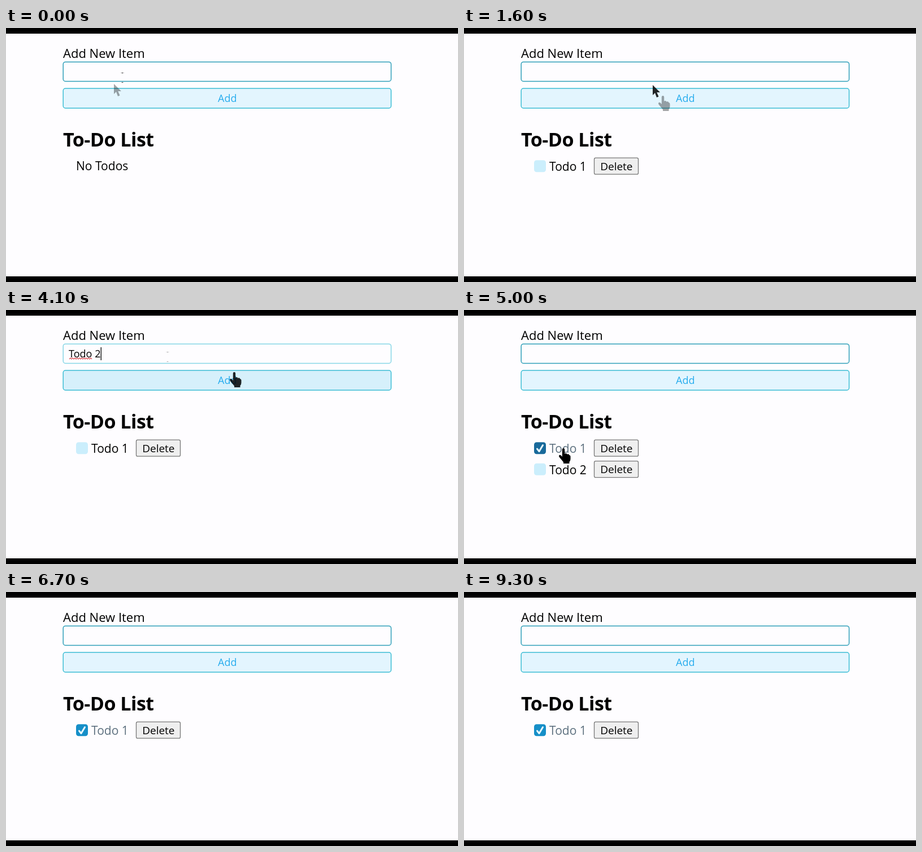
An HTML page that plays this animation: 800x450 px, repeating every 9.4 s.

```html
<!DOCTYPE html>
<html lang="en">
<head>
<meta charset="utf-8">
<title>To-do list</title>
<style>
  html, body { margin: 0; width: 100%; height: 100%; overflow: hidden; background: #000; }
  svg { display: block; width: 800px; height: 450px; font: 21px "Open Sans", "Noto Sans", sans-serif; }
  text { white-space: pre; }
  .label { font-size: 22px; }
  .title { font-size: 34px; font-weight: 700; letter-spacing: -.5px; }
  .small { font-size: 18px; font-weight: 500; }
  .add { fill: #28adee; text-anchor: middle; }
  .box { stroke-width: 1.5; }
  .delete rect { fill: #efefef; stroke: #777; stroke-width: 1.3; }
  .delete.hover rect { fill: #e4e4e4; }
  .delete text { font-size: 19px; font-weight: 500; text-anchor: middle; }
  .check { fill: #cbeefc; }
  .tick { display: none; fill: none; stroke: #e6f8ff; stroke-width: 3; stroke-linecap: round; stroke-linejoin: round; }
  .done .check { fill: #168fc8; }
  .done.hover .check { fill: #196a9b; }
  .done .tick { display: inline; }
  .done .name { fill: #5d707f; }
  .cursor path { fill: #fff; stroke: #222; stroke-width: 1.2; stroke-linejoin: round; }
  .cursor .beam { fill: none; stroke-width: 1.4; }
</style>
</head>
<body>
<svg viewBox="0 0 800 450">
  <defs>
    <g id="arrow"><path d="M0 0V18l4-4 3 8 3.5-1.5-3.2-7.5H13z"/></g>
    <g id="beam"><path class="beam" d="M-4-9q4 0 4 2 0-2 4-2M0-7V7M-4 9q4 0 4-2 0 2 4 2"/></g>
    <g id="hand">
      <path d="M-2.2 1.2a2.2 2.2 0 0 1 4.4 0V9q0-1 2-1t2.3 2q0-1 1.8-.8t2 1.8q2.2 0 2.2 2.5V18q0 3-2 5v3H0v-2.5L-7 15q-2-3 0-4 2-.8 4.8 3z"/>
      <path d="M2.2 9v5M6.2 10.5v4M9.4 11.5v3.5"/>
    </g>
  </defs>
  <rect y="10" width="800" height="430" fill="#fefdff"/>
  <text class="label" x="101" y="52.5">Add New Item</text>
  <rect id="field" class="box" x="101.2" y="60.2" width="580.4" height="34.2" rx="4"/>
  <text id="value" class="small" x="111" y="84"></text>
  <path id="squiggle" fill="none" stroke="#d8434a" stroke-width="1.1"/>
  <path id="caret" stroke="#000" stroke-width="1.3"/>
  <rect id="add" class="box" x="101.2" y="107" width="580.4" height="35" rx="4" stroke="#3bbdd4"/>
  <text class="small add" x="391.8" y="130.7">Add</text>
  <text class="title" x="101" y="210">To-Do List</text>
  <text id="empty" x="124" y="252">No Todos</text>
  <g id="rows"></g>
  <g id="ghost" class="cursor" opacity=".35"><use/></g>
  <g id="pointer" class="cursor"><use/></g>
</svg>
<script>
const LOOP = 9400, STEP = 100, ROW = 37.5;
const $ = id => document.getElementById(id);

$("rows").innerHTML = [1, 2].map(n => `
  <g id="row${n}" transform="translate(0 ${(n - 1) * ROW})">
    <rect class="check" x="124" y="234.2" width="21" height="21" rx="4.5"/>
    <path class="tick" d="M129.5 246l3.5 4.5 6.5-11"/>
    <text class="name" x="151" y="253">Todo ${n}</text>
    <g id="delete${n}" class="delete">
      <rect x="230.5" y="230.2" width="78" height="29" rx="2.5"/>
      <text x="269.8" y="251.6">Delete</text>
    </g>
  </g>`).join("");

let wave = "M112 87";
for (let i = 0; i < 10; i++) wave += "l2-2 2 2";
$("squiggle").setAttribute("d", wave);

// time, x, y of the pointer's hot spot
const path = [
  [-100, 191, 99], [0, 206, 88], [200, 230, 80], [900, 230, 80],
  [1100, 345, 118], [1200, 356, 124], [1400, 358, 126], [1500, 352, 121],
  [1600, 334, 101], [1900, 286, 83], [4000, 286, 83], [4100, 404, 111],
  [4200, 402, 122], [4400, 402, 122], [4700, 180, 240], [4800, 176, 246],
  [5100, 176, 246], [5500, 262, 284], [6300, 262, 284]
];
const POINTER_END = 6400;

// time, field text
const typing = [
  [0, ""], [300, "T"], [400, "To"], [500, "Tod"], [600, "Todo"], [700, "Todo "], [800, "Todo 1"],
  [1300, ""], [3000, "Todo 1"], [3600, "Todo "], [3800, "Todo 2"], [4300, ""]
];

const within = (t, a, b) => t >= a && t < b;
const inside = (p, x, y, w, h) => within(p.x, x, x + w) && within(p.y, y, y + h);
const onField = p => inside(p, 101, 60, 581, 35);
const onAdd = p => inside(p, 101, 107, 581, 35);
const onName = (p, n) => inside(p, 124, 232 + (n - 1) * ROW, 96, 26);
const onDelete = (p, n) => inside(p, 230, 230 + (n - 1) * ROW, 79, 30);

function pointAt(t) {
  let i = 0;
  while (i < path.length - 2 && path[i + 1][0] <= t) i++;
  const [t0, x0, y0] = path[i], [t1, x1, y1] = path[i + 1];
  const k = Math.min(1, Math.max(0, (t - t0) / (t1 - t0)));
  return { x: x0 + (x1 - x0) * k, y: y0 + (y1 - y0) * k };
}

const show = (el, on) => el.style.display = on ? "" : "none";

function drawCursor(el, p, rows) {
  const hot = onAdd(p) || rows.some(n => onName(p, n) || onDelete(p, n));
  const use = el.firstElementChild;
  use.setAttribute("href", onField(p) ? "#beam" : hot ? "#hand" : "#arrow");
  use.setAttribute("transform", `translate(${p.x} ${p.y})`);
}

function render(t) {
  const active = t < POINTER_END;
  const p = active ? pointAt(t) : { x: -99, y: -99 };
  const before = pointAt(t - STEP);
  const rows = [];
  if (t >= 1300) rows.push(1);
  if (within(t, 4300, 6300)) rows.push(2);

  // form
  const focus = within(t, 200, 1300) || within(t, 2100, 4300);
  const preview = within(t, 3000, 3500);
  const text = typing.filter(k => k[0] <= t).pop()[1];
  $("field").setAttribute("fill", preview ? "#e8f0fe" : "#fefdff");
  $("field").setAttribute("stroke", focus ? "#86d6e6" : "#2f9fb9");
  $("value").textContent = text;
  const end = 111.8 + (text ? $("value").getComputedTextLength() : 0);
  $("caret").setAttribute("d", `M${end} 66V89`);
  show($("caret"), focus && !preview && t % 1000 < 500);
  show($("squiggle"), focus && !preview && text.length > 4);
  $("add").setAttribute("fill", onAdd(p) && !within(t, 1500, 1700) ? "#d6f0fb" : "#e3f5fe");

  // list
  show($("empty"), !rows.length);
  for (const n of [1, 2]) {
    const row = $("row" + n);
    show(row, rows.includes(n));
    row.classList.toggle("done", n === 1 && t >= 4900);
    row.classList.toggle("hover", onName(p, n));
    $("delete" + n).classList.toggle("hover", onDelete(p, n));
  }

  // pointer with a faint trail while it moves
  const moved = Math.hypot(p.x - before.x, p.y - before.y) > 5;
  show($("pointer"), active);
  show($("ghost"), active && moved);
  $("pointer").setAttribute("opacity", moved ? .85 : 1);
  drawCursor($("pointer"), p, rows);
  drawCursor($("ghost"), before, rows);
}

const start = performance.now();
function tick() {
  const t = Math.max(0, performance.now() - start) % LOOP;
  render(Math.floor(t / STEP) * STEP);
  requestAnimationFrame(tick);
}
tick();
</script>
</body>
</html>
```
